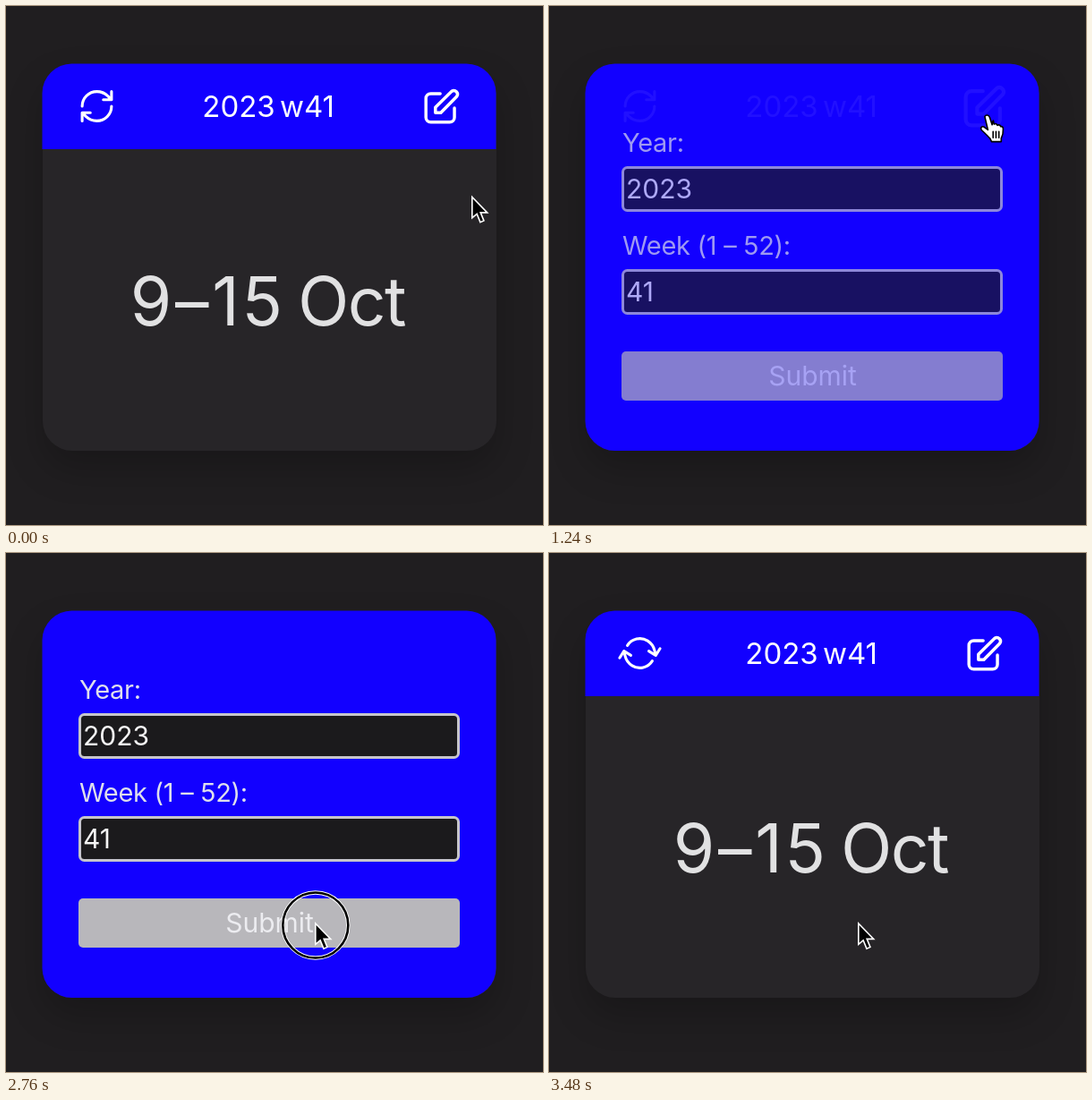
These frames come from a looping animation (600 by 580 pixels, 3520 ms). An HTML page:

```html
<!DOCTYPE html>
<html lang="en">
<head>
<meta charset="utf-8">
<title>Week card</title>
<style>
  html, body { margin: 0; width: 100%; height: 100%; overflow: hidden; background: #201e20; }
  svg { position: absolute; left: 0; top: 0; width: 600px; height: 580px; font-family: Inter, sans-serif; }
  .card { position: absolute; left: 40.5px; top: 64.5px; width: 507px; height: 432.5px;
          border-radius: 33px; background: #272528; box-shadow: 0 20px 40px rgba(0, 0, 0, .22); }
  .icon { fill: none; stroke: #fff; stroke-linecap: round; stroke-linejoin: round; }
  .mid { text-anchor: middle; }
  .date { font-size: 75px; fill: #e1e1e2; }
  .days { letter-spacing: .05em; }
  .month { letter-spacing: -.02em; }
  .head { font-size: 33px; fill: #fff; }
  .label { font-size: 29px; letter-spacing: -.01em; fill: #dfdfec; }
  .value { font-size: 30px; fill: #f6f6f6; }
  .field { fill: #1b1a1c; stroke: #c6c5ca; stroke-width: 3; }
</style>
</head>
<body>
<div class="card"></div>
<svg viewBox="0 0 600 580">
  <g class="date">
    <text class="days" x="138.7" y="357">9–15</text>
    <text class="month mid" x="386" y="357">Oct</text>
  </g>
  <path id="slab" fill="#1200ff"/>
  <g id="head">
    <g id="sync" class="icon" stroke-width="1.7">
      <path d="M3 12a9 9 0 0 1 9-9 9.75 9.75 0 0 1 6.74 2.74L21 8M21 3v5h-5M21 12a9 9 0 0 1-9 9 9.75 9.75 0 0 1-6.74-2.74L3 16M8 16H3v5"/>
    </g>
    <g class="head mid">
      <text x="260" y="123.5">2023</text>
      <text x="336.5" y="123.5">w41</text>
    </g>
    <g id="edit" class="icon" stroke-width="1.95">
      <path d="M11 4H5a3 3 0 0 0-3 3v12a3 3 0 0 0 3 3h12a3 3 0 0 0 3-3v-6M8 16v-3.4L18.3 2.5a2.3 2.3 0 0 1 3.2 3.2L11.4 16z"/>
    </g>
  </g>
  <g id="form">
    <text class="label" x="82" y="163">Year:</text>
    <rect class="field" x="82.5" y="180.5" width="423" height="48" rx="5"/>
    <text class="value" x="86" y="215">2023</text>
    <text class="label" x="82" y="278">Week (1 – 52):</text>
    <rect class="field" x="82.5" y="295.5" width="423" height="48" rx="5"/>
    <text class="value" x="86" y="330">41</text>
    <rect x="81" y="386" width="426" height="55" rx="5" fill="#b8b7bb"/>
    <text class="value mid" x="294.5" y="423.5" style="fill:#ececf0">Submit</text>
  </g>
  <g id="ring" fill="none">
    <circle cy="2" r="36.5" stroke="#fff" stroke-width="4.4"/>
    <circle cy="2" r="36.5" stroke="#000" stroke-width="2.6"/>
  </g>
  <g id="arrow">
    <path transform="scale(.95)" d="M0 0V24.5L5.6 19.8L9.6 29.6L13.8 27.8L9.9 18.3H17.8Z" fill="#000" stroke="#fff" stroke-width="1.7"/>
  </g>
  <g id="hand">
    <g transform="translate(-2 -1) scale(1.08)" stroke="#000" stroke-width="1.5" stroke-linejoin="round" stroke-linecap="round">
      <path fill="#fff" d="M-1 .6C0-1.6 3-1.4 4 1.2L6.6 9C8-.2 8 8 8.6 8.4C10 7.4 11.6 8 12 9.6C13.4 8.6 15 9.4 15.4 10.8C17 10.4 18 11.6 18 13.4C18.2 17.6 17.6 20 16 23V26.5H6L4.6 23.5C2 20.4-1 17.6-4 14.8C-6.4 12.4-4 10-1.6 11.4L2.2 14.2Z"/>
      <path fill="none" d="M7.6 16v6.5M10.6 16v6.5M13.6 16v6.5"/>
    </g>
  </g>
</svg>
<script>
const LOOP = 3520;
const el = id => document.getElementById(id);
const set = (id, name, value) => el(id).setAttribute(name, value);
const show = (id, on) => set(id, 'visibility', on ? 'visible' : 'hidden');

function bezier(x1, y1, x2, y2) {
  const at = (a, b, s) => 3 * a * s * (1 - s) ** 2 + 3 * b * s * s * (1 - s) + s ** 3;
  return x => {
    let lo = 0, hi = 1;
    for (let i = 0; i < 24; i++) {
      const mid = (lo + hi) / 2;
      if (at(x1, x2, mid) < x) lo = mid; else hi = mid;
    }
    return at(y1, y2, lo);
  };
}
const linear = x => x;
const ease = bezier(.25, .1, .25, 1);
const inOut = bezier(.42, 0, .58, 1);

// first value, then steps of: start time, duration, target value, easing
const tracks = {
  cursorX: [520.8, [20, 360, 490, inOut], [1560, 660, 345.8, inOut]],
  cursorY: [213.5, [20, 360, 124, inOut], [1560, 660, 414, inOut]],
  hover:   [1, [310, 160, 1.2, ease], [1660, 160, 1, ease]],
  open:    [0, [912, 300, 1, inOut], [3035, 300, 0, inOut]],
  head:    [1, [960, 300, 0, linear], [2920, 290, 1, linear]],
  form:    [0, [1040, 500, 1, ease], [2880, 500, 0, ease]],
  spin:    [0, [3385, 1000, 360, ease]]
};

function value(name, t) {
  let [v, ...steps] = tracks[name];
  for (const [start, length, to, curve] of steps) {
    if (t > start) v += (to - v) * (t >= start + length ? 1 : curve((t - start) / length));
  }
  return v;
}

function slabPath(open) {
  const l = 40.5, r = 547.5, top = 64.5, R = 33;
  const bottom = 160 + 337 * open;
  const b = R * Math.min(1, open * 1.8);
  return `M${l} ${top + R}a${R} ${R} 0 0 1 ${R} ${-R}H${r - R}a${R} ${R} 0 0 1 ${R} ${R}` +
    `V${bottom - b}a${b} ${b} 0 0 1 ${-b} ${b}H${l + b}a${b} ${b} 0 0 1 ${-b} ${-b}Z`;
}

function draw(t) {
  const x = value('cursorX', t), y = value('cursorY', t);
  const overIcon = x > 464 && x < 510 && y < 134;
  const place = `translate(${x} ${y})`;

  set('slab', 'd', slabPath(value('open', t)));
  set('head', 'opacity', value('head', t));
  set('form', 'opacity', value('form', t));
  set('sync', 'transform', `translate(101.5 112) rotate(${value('spin', t)}) scale(1.82) translate(-12 -12)`);
  set('edit', 'transform', `translate(487 112) scale(${1.77 * value('hover', t)}) translate(-12.06 -11.94)`);

  for (const id of ['arrow', 'hand', 'ring']) set(id, 'transform', place);
  show('hand', overIcon);
  show('arrow', !overIcon);
  show('ring', (t >= 720 && t < 880) || (t >= 2640 && t < 2840));
}

const begin = performance.now();
function tick() {
  draw((performance.now() - begin) % LOOP);
  requestAnimationFrame(tick);
}
tick();
</script>
</body>
</html>
```
